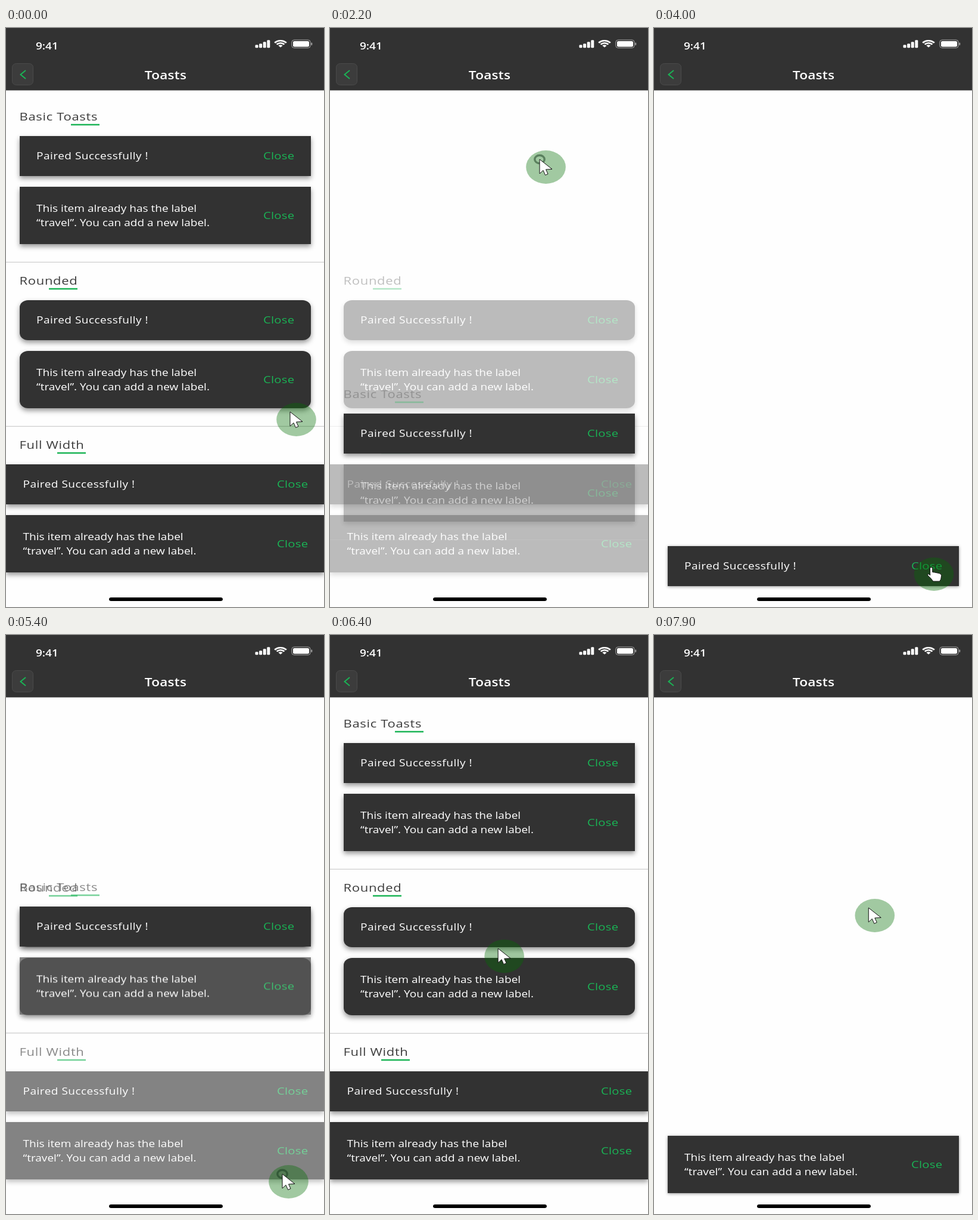
Animation, 534 px wide and 970 px high, one loop 8 s. Source, as an HTML page with a canvas:

```html
<!DOCTYPE html>
<html lang="en">
<head>
<meta charset="utf-8">
<title>Toasts</title>
<style>
  html, body { margin: 0; width: 100%; height: 100%; overflow: hidden; background: #fefefe; }
  canvas { display: block; width: 534px; height: 970px; }
</style>
</head>
<body>
<canvas id="stage" width="534" height="970"></canvas>
<script>
const W = 534, H = 970, LOOP = 8000, STEP = 100;
const ASPECT = 1.19;      // the whole screen has wide pixels
const SECTION = 275;      // distance between list sections
const SHORT = { top: 181, height: 67 };
const TALL = { top: 266, height: 96 };
const FLOOR = 935;        // lower edge of a toast shown alone
const DROP = FLOOR - SHORT.height - SHORT.top;
const DARK = '#323232', GREEN = '#1ab455', WHITE = '#ffffff', PAPER = '#fefefe';
const ctx = document.getElementById('stage').getContext('2d');

function text(g, str, x, y, size, color, { weight = 500, spacing = 0, align = 'left' } = {}) {
  g.save();
  g.translate(x, y);
  g.scale(ASPECT, 1);
  g.font = `${weight} ${size}px "Open Sans", "Noto Sans", sans-serif`;
  g.letterSpacing = spacing + 'px';
  g.textAlign = align;
  g.fillStyle = color;
  g.fillText(str, 0, 0);
  g.restore();
}

function box(g, x, y, w, h, r, color) {
  g.fillStyle = color;
  g.beginPath();
  g.roundRect(x, y, w, h, { x: r * ASPECT, y: r });
  g.fill();
}

function line(g, color, width, ...points) {
  g.strokeStyle = color;
  g.lineWidth = width;
  g.beginPath();
  points.forEach(([x, y]) => g.lineTo(x, y));
  g.stroke();
}

function layer(draw) {
  const canvas = document.createElement('canvas');
  canvas.width = W;
  canvas.height = H;
  draw(canvas.getContext('2d'));
  return canvas;
}

function paste(image, alpha, dy = 0) {
  ctx.globalAlpha = alpha;
  ctx.drawImage(image, 0, dy);
  ctx.globalAlpha = 1;
}

// ---- list ----
const BASIC = { x: 23, w: 489, r: 0, textX: 51, closeX: 432 };
const ROUND = { ...BASIC, r: 12 };
const FULL = { x: 0, w: W, r: 0, textX: 28.5, closeX: 455 };

function toast(g, style, kind, y, lift = 4) {
  g.save();
  g.shadowColor = 'rgba(0,0,0,.42)';
  g.shadowBlur = 4 + lift;
  g.shadowOffsetY = lift;
  box(g, style.x, y, style.w, kind.height, style.r, DARK);
  g.restore();
  if (kind === TALL) {
    text(g, 'This item already has the label', style.textX, y + 42, 16, WHITE);
    text(g, '“travel”. You can add a new label.', style.textX, y + 66, 16, WHITE);
  } else {
    text(g, 'Paired Successfully !', style.textX, y + 39, 16, WHITE, { spacing: .4 });
  }
  text(g, 'Close', style.closeX, y + kind.height / 2 + 5.5, 17, GREEN, { spacing: .2 });
}

function heading(g, title, dy, underline) {
  text(g, title, 22.5, dy + 155, 18.5, '#3c3c3c', { spacing: .55 });
  line(g, GREEN, 2.4, [underline, dy + 162], [underline + 48, dy + 162]);
}

function divider(g, dy) {
  line(g, '#cfcfcf', 1.2, [0, dy + 392.4], [W, dy + 392.4]);
}

const basicRest = layer(g => {
  heading(g, 'Basic Toasts', 0, 109);
  toast(g, BASIC, TALL, TALL.top);
  divider(g, 0);
});
const otherSections = layer(g => {
  [['Rounded', 72, ROUND], ['Full Width', 86, FULL]].forEach(([title, underline, style], i) => {
    const dy = SECTION * (i + 1);
    heading(g, title, dy, underline);
    toast(g, style, SHORT, SHORT.top + dy);
    toast(g, style, TALL, TALL.top + dy);
  });
  divider(g, SECTION);
});
const shortRaised = layer(g => toast(g, BASIC, SHORT, SHORT.top));
const shortResting = layer(g => toast(g, BASIC, SHORT, SHORT.top, 1));
const tallResting = layer(g => toast(g, BASIC, TALL, FLOOR - TALL.height, 1));

// ---- fixed screen parts ----
function wifi(g, x, y) {
  const from = -Math.PI * .76, to = -Math.PI * .24;
  g.save();
  g.translate(x, y);
  g.scale(ASPECT, 1);
  g.strokeStyle = g.fillStyle = WHITE;
  g.lineWidth = 2.6;
  for (const r of [11.2, 7.2]) {
    g.beginPath();
    g.arc(0, 0, r, from, to);
    g.stroke();
  }
  g.beginPath();
  g.moveTo(0, 0);
  g.arc(0, 0, 4.2, from, to);
  g.fill();
  g.restore();
}

function battery(g, x, y) {
  box(g, x + 2.2, y + 2, 27, 9.4, 2, WHITE);
  box(g, x + 32.6, y + 4.5, 1.8, 4.6, .8, '#a4a4a4');
  g.strokeStyle = '#a4a4a4';
  g.lineWidth = 1;
  g.beginPath();
  g.roundRect(x, y, 31.4, 13.4, 4);
  g.stroke();
}

const chrome = layer(g => {
  box(g, 0, 0, W, 104.5, 0, DARK);
  text(g, '9:41', 50, 36, 16, WHITE, { weight: 600 });
  text(g, 'Toasts', 268, 86, 19, WHITE, { weight: 600, spacing: .2, align: 'center' });

  box(g, 10.5, 59.5, 35, 36, 6, '#3c3c3c');
  g.strokeStyle = '#4a4a4a';
  g.lineWidth = 1;
  g.stroke();
  line(g, GREEN, 2, [33, 71], [24.5, 78], [33, 85]);

  [5, 7, 10, 13].forEach((h, i) => box(g, 418.5 + i * 6.6, 33.2 - h, 5, h, 1.3, WHITE));
  wifi(g, 461, 32.5);
  battery(g, 479.8, 20);
  box(g, 173, 954, 191, 6, 3, '#000000');
});

// ---- timing ----
const clamp = u => Math.min(1, Math.max(0, u));
const easeOut = u => 1 - (1 - u) ** 2;
const easeInOut = u => u < .5 ? 4 * u ** 3 : 1 - 4 * (1 - u) ** 3;
const phase = (t, start) => clamp((t - start) / 350);
const TRANSITIONS = { showShort: 2049, hideShort: 5271, showTall: 7294 };

// ---- pointer ----
// each move is a curve of the halo centre: start, end, from, via, to
const MOVES = [
  [200, 600, [487.5, 656], [540, 635], [600, 590]],
  [1100, 1800, [568, 268], [300, 230], [362.5, 233]],
  [2200, 3700, [362.5, 233], [590, 1060], [470, 915]],
  [5100, 5300, [470, 915], [473, 916], [474.5, 916]],
  [6000, 6900, [474.5, 916], [100, 247], [384, 324]],
  [7700, 8100, [384, 324], [371, 470], [357, 616]]
];
const ARROW = new Path2D('M0 0V24L6 18.5 9.5 26.5 14 24.5 10.5 17 21 16.5Z');
const HAND = new Path2D('M-6.5-9.5q0-2 2-2t2.2 2v6l4 .6 7 1.4q4 .8 4 4l-1 6-2 3.5h-11l-3-4-6-6q-1.5-2.5 2-2l2 2z');

function pointerAt(t) {
  const [start, end, from, via, to] = MOVES.findLast(move => move[0] <= t) ?? MOVES[0];
  const u = easeInOut(clamp((t - start) / (end - start))), v = 1 - u;
  return from.map((a, i) => a * v * v + 2 * via[i] * u * v + to[i] * u * u);
}

// is a toast that can be pressed under this height?
function isPressable(y, listShown, shortShown) {
  const within = (kind, top) => y > top && y < top + kind.height;
  if (shortShown) return within(SHORT, SHORT.top + DROP);
  return listShown && [0, 1, 2].some(i =>
    [SHORT, TALL].some(kind => within(kind, kind.top + SECTION * i)));
}

function drawPointer(t, listShown, shortShown) {
  const [x, y] = pointerAt(t);
  const tipX = x - 10.5, tipY = y - 13;
  ctx.fillStyle = 'rgba(0,108,0,.37)';
  ctx.beginPath();
  ctx.ellipse(x, y, 28 * ASPECT, 28, 0, 0, 7);
  ctx.fill();

  const pressed = Object.values(TRANSITIONS).some(start => phase(t, start) % 1 > 0);
  if (pressed) {
    ctx.strokeStyle = 'rgba(20,55,28,.5)';
    ctx.lineWidth = 3.4;
    ctx.beginPath();
    ctx.ellipse(tipX, tipY, 8.2, 6.8, 0, 0, 7);
    ctx.stroke();
  }

  const hover = isPressable(tipY, listShown, shortShown);
  const shape = hover ? HAND : ARROW;
  ctx.save();
  ctx.translate(hover ? x : tipX, hover ? y : tipY);
  ctx.fillStyle = WHITE;
  ctx.strokeStyle = '#111111';
  ctx.lineWidth = 1;
  ctx.fill(shape);
  ctx.stroke(shape);
  ctx.restore();
}

// ---- scene ----
function render(t) {
  const amount = start => easeOut(phase(t, start));
  const short = amount(TRANSITIONS.showShort) - amount(TRANSITIONS.hideShort);
  const tall = amount(TRANSITIONS.showTall);
  const listAlpha = (1 - short) * (1 - tall);

  ctx.fillStyle = PAPER;
  ctx.fillRect(0, 0, W, H);
  paste(otherSections, listAlpha);
  paste(basicRest, listAlpha, DROP * short);
  paste(short < 1 ? shortRaised : shortResting, 1 - tall, DROP * short);
  paste(tallResting, Math.min(1, tall * 1.45));
  paste(chrome, 1);
  drawPointer(t, listAlpha === 1, short === 1);
}

function frame(now) {
  render(Math.floor(now % LOOP / STEP) * STEP);
  requestAnimationFrame(frame);
}
render(0);
requestAnimationFrame(frame);
</script>
</body>
</html>
```
